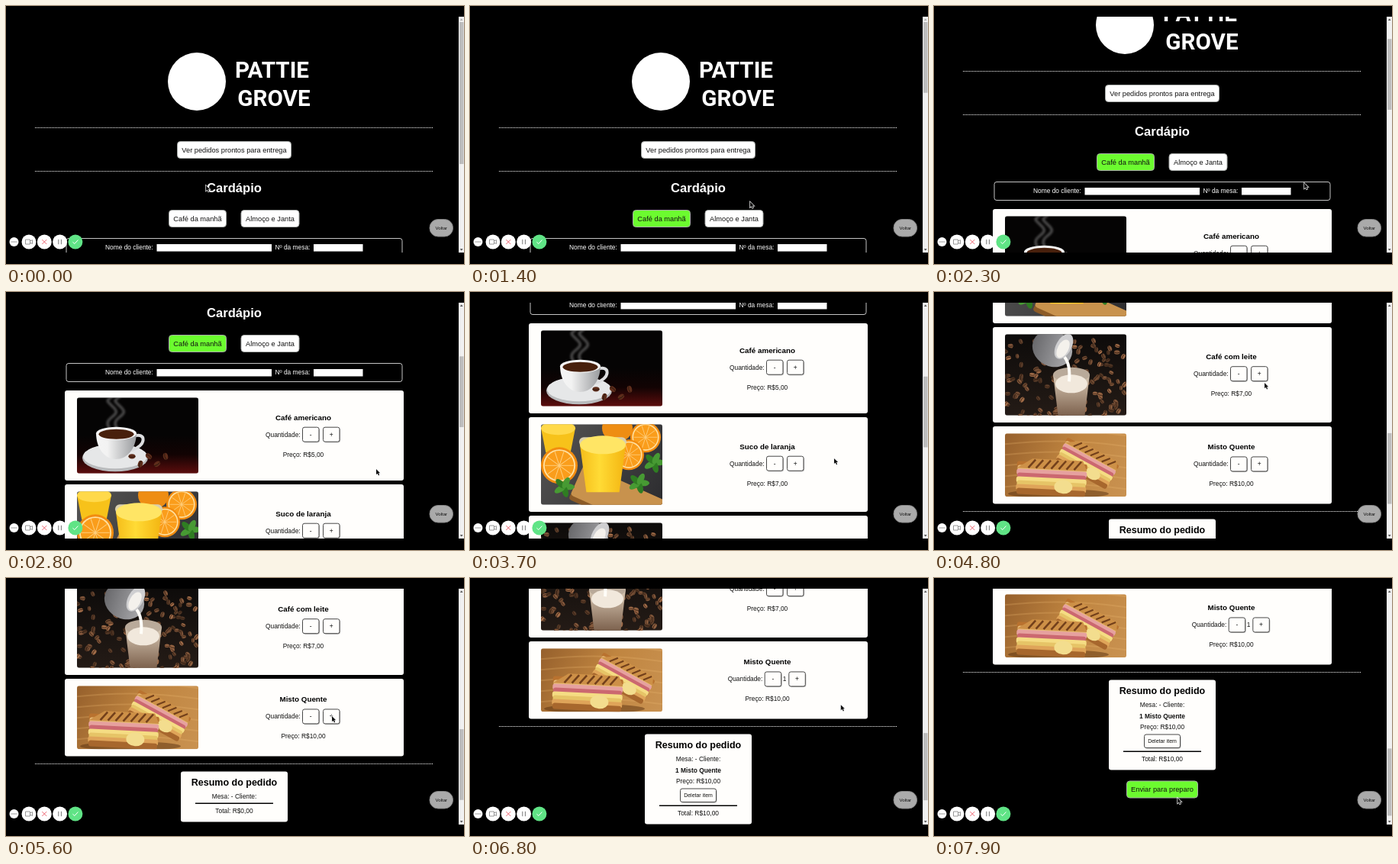
An HTML page with a canvas that plays this animation: 600 by 338 pixels, repeating every 8 s.

```html
<!DOCTYPE html>
<html lang="pt-BR">
<head>
<meta charset="utf-8">
<title>Cardápio</title>
<style>
html, body { margin: 0; width: 100%; height: 100%; overflow: hidden; background: #000; }
canvas { display: block; width: 600px; height: 338px; }
</style>
</head>
<body>
<canvas id="stage" width="600" height="338"></canvas>
<script>
const ctx = document.getElementById('stage').getContext('2d');
const LOOP = 8000, TOP = 14, BOTTOM = 323, MID = 299, VIEW = BOTTOM - TOP;
const GREEN = '#6cfb2f', PAPER = '#fffefc';
const MENU_AT = 900, ADD_AT = 6000, SEND_AT = 7550;
const BODY = 8.4, LABEL = 9.25;

// Where the page is scrolled to and where the pointer rests along the way.
const STOPS = [
  { t: 200, scroll: 0, x: 262, y: 235 },
  { t: 800, scroll: 0, x: 254, y: 280 },
  { t: 2030, scroll: 0, x: 485, y: 232 },
  { t: 2800, scroll: 211, x: 485, y: 232 },
  { t: 3700, scroll: 299, x: 477, y: 218 },
  { t: 4800, scroll: 546, x: 433, y: 119 },
  { t: 5600, scroll: 590, x: 427, y: 181 },
  { t: 6450, scroll: 590, x: 427, y: 181 },
  { t: 6800, scroll: 639, x: 486, y: 166 },
  { t: 7600, scroll: 710, x: 319, y: 288 }
];

function pose(t) {
  const next = STOPS.findIndex(s => s.t > t);
  if (next === 0) return STOPS[0];
  if (next < 0) return STOPS[STOPS.length - 1];
  const a = STOPS[next - 1], b = STOPS[next], p = (t - a.t) / (b.t - a.t);
  const mix = key => a[key] + (b[key] - a[key]) * p;
  return { scroll: Math.round(mix('scroll')), x: mix('x'), y: mix('y') };
}

function text(s, x, mid, size, { bold = false, align = 'center', color = '#111' } = {}) {
  ctx.font = `${bold ? 'bold ' : ''}${size}px "Liberation Sans", Arial, sans-serif`;
  ctx.textAlign = align;
  ctx.fillStyle = color;
  ctx.fillText(s, x, mid + size * 0.36);
}

function box(x, y, w, h, r, fill, stroke) {
  ctx.beginPath();
  ctx.roundRect(x, y, w, h, r);
  if (fill) { ctx.fillStyle = fill; ctx.fill(); }
  if (stroke) { ctx.strokeStyle = stroke; ctx.lineWidth = 1; ctx.stroke(); }
}

function oval(x, y, rx, ry, fill, turn = 0) {
  ctx.beginPath();
  ctx.ellipse(x, y, rx, ry, turn, 0, Math.PI * 2);
  ctx.fillStyle = fill;
  ctx.fill();
}

function shape(path, fill) {
  ctx.fillStyle = fill;
  ctx.fill(new Path2D(path));
}

function curve(path, stroke, width) {
  ctx.strokeStyle = stroke;
  ctx.lineWidth = width;
  ctx.stroke(new Path2D(path));
}

function fade(x, y, ...colors) {
  const g = ctx.createLinearGradient(0, 0, x, y);
  colors.forEach((c, i) => g.addColorStop(i / (colors.length - 1), c));
  return g;
}

function at(x, y, turn, scale, paint) {
  ctx.save();
  ctx.translate(x, y);
  ctx.rotate(turn);
  ctx.scale(scale, scale);
  paint();
  ctx.restore();
}

function seeded(seed) {
  return () => (seed = (seed * 16807) % 2147483647) / 2147483647;
}

function bean(x, y, r, turn, color) {
  at(x, y, turn, r, () => {
    oval(0, 0, 1, 0.7, color);
    curve('M-1 0Q0 .5 1 0', '#2a170d', 0.2);
  });
}

// A tapering glass filled to the rim.
function glass(x, y, w, h, fill, top) {
  const inset = w * 0.14, ry = w * 0.2;
  shape(`M${x} ${y}h${w}l${-inset} ${h}h${2 * inset - w}z`, fill);
  oval(x + w / 2, y, w / 2, ry, top);
}

function coffee(w, h) {
  box(0, 0, w, h, 0, fade(0, h, '#050404', '#050404', '#050404', '#120303', '#5c0d0d'));
  ctx.save();
  ctx.filter = 'blur(1.5px)';
  for (const dx of [0, 10]) curve(`M${43 + dx} 41c-12 -16 18 -16 5 -28s-8 -8 0 -16`, 'rgba(185,185,185,.45)', 3);
  ctx.restore();
  oval(50, 79, 43, 18, '#b9bbbd');
  oval(50, 77, 42, 16, '#e6e7e8');
  curve('M73 51C92 44 91 64 71 69', '#dcdddf', 4);
  shape('M25 47C26 92 76 92 78 47Z', fade(80, 0, '#fafafa', '#f2f2f2', '#939598'));
  oval(51.5, 47, 26.5, 8.5, '#f6f6f6');
  oval(51.5, 48, 23, 6.5, '#48200c');
  for (let i = 0; i < 5; i++) bean(72 + i * 11, 77 + (i % 2) * 10, 4.5, i * 1.9, '#5e2d1b');
}

function orange(x, y, r) {
  oval(x, y, r, r, '#f28c0f');
  oval(x, y, r * 0.88, r * 0.88, '#ffe0a0');
  oval(x, y, r * 0.8, r * 0.8, '#fa9d1b');
  for (let i = 0; i < 5; i++) at(x, y, i * Math.PI / 5, r, () => curve('M-.78 0H.78', '#ffcf7d', 0.04));
}

function leaves(x, y) {
  for (let i = 0; i < 5; i++) at(x, y, i * 1.3, 1, () => oval(6, 0, 8, 4, i % 2 ? '#2f7d22' : '#479a33'));
}

function juice(w, h) {
  box(0, 0, w, h, 0, fade(w, h, '#565554', '#2c2c2f'));
  at(45, 78, 0.42, 1, () => {
    box(0, -24, 125, 46, 4, '#8c5b27');
    box(0, -28, 125, 44, 4, '#c8924d');
  });
  glass(0, 5, 45, 32, '#f7c21a', '#ffd94a');
  oval(100, 5, 20, 18, '#ee8d13');
  orange(137, 17, 20);
  orange(115, 40, 20);
  orange(24, 54, 24);
  leaves(30, 82);
  leaves(148, 50);
  leaves(128, 77);
  box(50, 17, 62, 12, 6, '#d9cfae');
  glass(51, 27, 60, 62, fade(115, 0, '#f0ad0c', '#f0ad0c', '#ffdb35', '#f2b00d'), '#ffe565');
}

function latte(w, h) {
  box(0, 0, w, h, 0, fade(0, h, '#0d0b0a', '#241b16'));
  const rnd = seeded(77);
  for (let i = 0; i < 150; i++) {
    bean(rnd() * w, 8 + rnd() * h, 3 + rnd(), rnd() * 3, `hsl(24 38% ${22 + rnd() * 24}%)`);
  }
  oval(62, 19, 27, 23, fade(95, 30, '#3c3c3f', '#77777a', '#b4b4b7'), 0.5);
  oval(77, 16, 10, 18, '#cfcfd1', 0.5);
  oval(76, 19, 7, 13, '#f4f1ec', 0.5);
  glass(63, 53, 48, 55, fade(0, h, '#eee6da', '#d8c8b4', '#7d624e'), '#b9aa9a');
  oval(87, 65, 21, 12, '#f1e8dc');
  curve('M78 30Q86 40 84 62', '#fffdf8', 4);
}

function toast() {
  const layers = ['#b9722f', '#e8bd78', '#e6a19f', '#cb6870', '#f5dc83', '#e6c467', '#dfa459', '#a7672d'];
  layers.forEach((color, i) => box(i % 2, i * 5, 92 - 2 * (i % 2), 8, 3, color));
  shape('M0 9L20 -4H86L92 9Z', '#cd9047');
  for (let x = 24; x < 90; x += 10) curve(`M${x} -3l-9 11`, '#73401b', 2.6);
  oval(62, 31, 12, 9, '#f3dd8e');
}

function sandwich(w, h) {
  box(0, 0, w, h, 0, fade(w, h, '#96602c', '#c08540', '#c99251'));
  for (let y = 0; y < h; y += 14) curve(`M0 ${y}Q80 ${y - 9} ${w} ${y + 3}`, 'rgba(235,184,112,.25)', 2);
  oval(70, 79, 66, 6, 'rgba(77,38,10,.45)');
  at(82, 5, 0.5, 0.84, toast);
  at(16, 36, 0.05, 1, toast);
}

// Cards stack downwards, each sized by its photo.
const ITEMS = [
  { name: 'Café americano', price: 5, photo: coffee, size: 99.5 },
  { name: 'Suco de laranja', price: 7, photo: juice, size: 105.5 },
  { name: 'Café com leite', price: 7, photo: latte, size: 106.5 },
  { name: 'Misto Quente', price: 10, photo: sandwich, size: 83 }
];
let end = 335;
for (const item of ITEMS) {
  item.y = end + 5;
  item.h = item.size + 18.5;
  end = item.y + item.h;
}

function button(label, x, y, w, on) {
  box(x + 0.5, y + 0.5, w - 1, 22, 4, on ? GREEN : '#fff', '#a8aba9');
  text(label, x + w / 2, y + 11.5, LABEL);
}

function smallButton(label, x, y, w, h, size) {
  box(x + 1, y + 1, w, h, 3, 'rgba(0,0,0,.3)');
  box(x, y, w, h, 2.5, PAPER, '#484848');
  text(label, x + w / 2, y + h / 2, size);
}

function card({ name, price, y, h, photo, size }, count) {
  const mid = y + h / 2, row = mid - 1.3, shift = count ? 2.3 : 0;
  box(77, y, 444, h, 3, PAPER);
  ctx.save();
  ctx.translate(93, y + 9.3);
  ctx.beginPath();
  ctx.roundRect(0, 0, 159, size, 3);
  ctx.clip();
  photo(159, size);
  ctx.restore();
  text(name, 389.5, mid - 23.8, 9.8, { bold: true, color: '#000' });
  text('Quantidade:', 340 - shift, row, BODY, { align: 'left' });
  smallButton('-', 388.5 - shift, row - 9.5, 21.5, 19, BODY);
  if (count) text(count, 412, row, BODY);
  smallButton('+', 415.5 + shift, row - 9.5, 21.5, 19, BODY);
  text(`Preço: R$${price},00`, 389.5, mid + 24.7, BODY);
}

function divider(y) {
  ctx.fillStyle = '#fff';
  for (let x = 38; x < 560; x += 2) ctx.fillRect(x, y, 1, 1);
}

const brandFont = size => `bold extra-condensed ${size}px Roboto, sans-serif`;
ctx.font = brandFont(42);
const brandSize = 42 * Math.min(1, 97 / ctx.measureText('PATTIE').width);

function header(chosen) {
  oval(250, 99, 38, 38, '#fff');
  ctx.font = brandFont(brandSize);
  ctx.textAlign = 'center';
  ctx.fillStyle = '#fff';
  ctx.fillText('PATTIE', 348.5, 83 + brandSize * 0.355);
  ctx.fillText('GROVE', 351, 120 + brandSize * 0.355);
  divider(159);
  button('Ver pedidos prontos para entrega', 224, 177, 150);
  divider(216);
  text('Cardápio', MID, 238, 16.6, { bold: true, color: '#fff' });
  button('Café da manhã', 213, 267, 76, chosen);
  button('Almoço e Janta', 307.5, 267, 77);
  box(79, 304.5, 440, 24, 3, null, '#c4c4c4');
  const white = { align: 'left', color: '#fff' };
  text('Nome do cliente:', 130, 316, BODY, white);
  text('Nº da mesa:', 352.5, 316, BODY, white);
  box(197.5, 312, 150.5, 9.5, 0, '#fff');
  box(403, 312, 64.5, 9.5, 0, '#fff');
}

function order(top, added, hover) {
  const gap = added ? 52 : 0, line = 14.3;
  box(229, top, 140, 66 + gap, 3, PAPER);
  text('Resumo do pedido', MID, top + 13.5, 12.5, { bold: true, color: '#000' });
  const first = top + 32.7;
  text('Mesa: - Cliente:', MID, first, BODY);
  if (added) {
    text('1 Misto Quente', MID, first + line, BODY, { bold: true });
    text('Preço: R$10,00', MID, first + 2 * line, BODY);
    smallButton('Deletar item', 275.5, top + 71.5, 47, 17.5, 7);
  }
  box(248, top + 41 + gap, 102, 1.4, 0, '#000');
  text(`Total: R$${added ? 10 : 0},00`, MID, top + 51.7 + gap, BODY);
  button('Enviar para preparo', 252, top + 80 + gap, 94, hover);
}

function scrollbar(scroll, height) {
  const k = 295 / height;
  box(593, TOP, 7, VIEW, 0, '#f1f1f1');
  box(594, 21 + scroll * k, 5.5, VIEW * k, 0, '#bebebe');
  shape('M594.8 19l1.9 -2.5l1.9 2.5z', scroll ? '#555' : '#aaa');
  shape('M594.8 318l1.9 2.5l1.9 -2.5z', '#555');
}

function toolbar() {
  const icons = [
    ['M-4.5 -3h6v6h-6zM1.5 -1l3 -1.5v5l-3 -1.5', '#999'],
    ['M-3 -3l6 6m0 -6l-6 6', '#ee6a76'],
    ['M-1.8 -3.2v6.4m3.6 -6.4v6.4', '#777'],
    ['M-3.5 .2l2.4 2.3l4.6 -5', '#fff']
  ];
  oval(10.5, 309, 6, 6, '#fff');
  for (let x = 8; x <= 13; x += 2.5) oval(x, 309, 0.7, 0.7, '#555');
  icons.forEach(([path, color], i) => at(30 + i * 20.3, 309, 0, 1, () => {
    oval(0, 0, 9.5, 9.5, i === 3 ? '#60e486' : '#fff');
    curve(path, color, 1);
  }));
}

function pointer(x, y) {
  const arrow = 'M0 0V7.2L1.7 5.7L3 8.4L4.2 7.8L3 5.2H5.2Z';
  at(x, y, 0, 1, () => {
    curve(arrow, '#fff', 1.3);
    shape(arrow, '#111');
  });
}

function draw(t) {
  const { scroll, x, y } = pose(t);
  const open = t >= MENU_AT, added = t >= ADD_AT;
  box(0, 0, 600, 338, 0, '#000');

  ctx.save();
  ctx.beginPath();
  ctx.rect(0, TOP, 600, VIEW);
  ctx.clip();
  at(0, -scroll, 0, 1, () => {
    header(t >= 650);
    if (!open) return;
    ITEMS.forEach((item, i) => card(item, added && i === 3 ? 1 : 0));
    divider(Math.round(end + 9.5));
    order(end + 20, added, t >= SEND_AT);
  });
  box(555, 279.5, 30.5, 22.5, 11, '#aaa', '#858585');
  text('Voltar', 570.3, 291, 6.1);
  scrollbar(scroll, added ? 1035 : open ? 983 : 490);
  ctx.restore();

  toolbar();
  pointer(x, y);
}

const start = performance.now();
function frame() {
  draw((performance.now() - start) % LOOP);
  requestAnimationFrame(frame);
}
frame();
</script>
</body>
</html>
```
